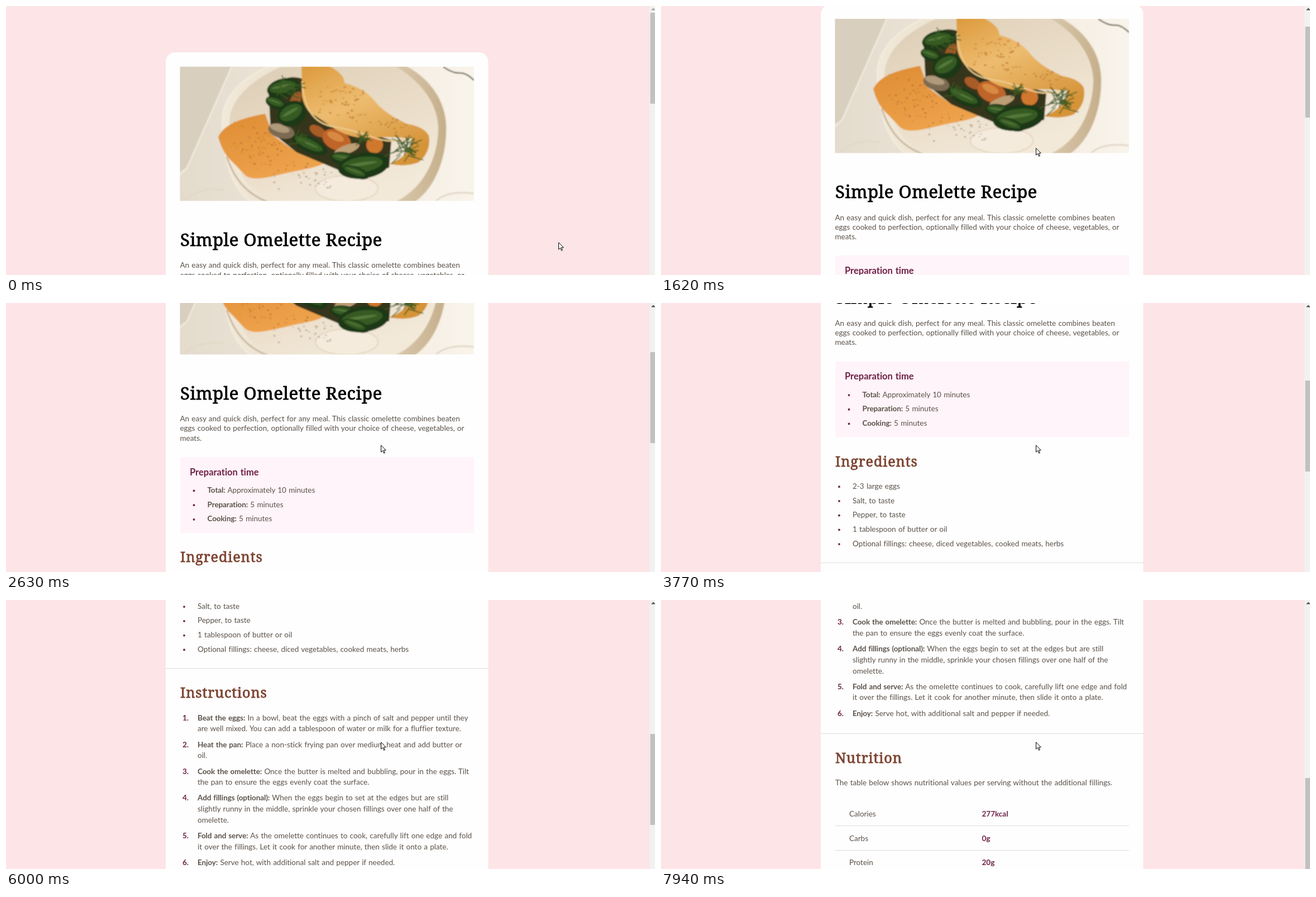
These frames come from a looping animation (1162x482 px, 8 s). An HTML page:

```html
<!DOCTYPE html>
<html lang="en">
<head>
<meta charset="utf-8">
<title>Simple Omelette Recipe</title>
<style>
  html, body { margin: 0; width: 100%; height: 100%; overflow: hidden; background: #fce4e7; }
  svg { display: block; }
  text { font: 13.5px Lato, sans-serif; letter-spacing: -.01px; word-spacing: .8px; fill: #5b5249; }
  .bold { font-weight: 700; letter-spacing: -.1px; }
  .rose { font-weight: 700; fill: #6e2347; }
  .label { font-size: 16.5px; }
  .title, .section { font-family: "Noto Serif", serif; word-spacing: 0; stroke-width: .8px; }
  .title { font-size: 31.2px; letter-spacing: .5px; fill: #000; stroke: #000; }
  .section { font-size: 25.2px; letter-spacing: .9px; fill: #7d4431; stroke: #7d4431; }
  .crisp { shape-rendering: crispEdges; }
</style>
</head>
<body>
<svg width="1162" height="482" viewBox="0 0 1162 482">
  <defs>
    <clipPath id="frame"><rect x="311.5" y="108.8" width="526.5" height="240.5"/></clipPath>
    <filter id="soft" x="0" y="0" width="1" height="1"><feGaussianBlur stdDeviation=".9"/></filter>
    <linearGradient id="marble">
      <stop offset="0" stop-color="#e3dbcc"/><stop offset=".5" stop-color="#eee7da"/><stop offset="1" stop-color="#faf5ec"/>
    </linearGradient>
    <linearGradient id="rim">
      <stop offset="0" stop-color="#f1e8d9"/><stop offset=".6" stop-color="#e8dbc6"/><stop offset="1" stop-color="#c5ae8a"/>
    </linearGradient>
    <linearGradient id="dish" x2=".6" y2="1">
      <stop offset="0" stop-color="#dccdb4"/><stop offset=".55" stop-color="#e9dcc7"/><stop offset="1" stop-color="#f3e9d9"/>
    </linearGradient>
    <linearGradient id="crepe" x2=".6" y2="1">
      <stop offset="0" stop-color="#dc9a3c"/><stop offset=".45" stop-color="#edbc70"/><stop offset="1" stop-color="#d69439"/>
    </linearGradient>
    <linearGradient id="hummus" x2=".5" y2="1">
      <stop offset="0" stop-color="#de8c33"/><stop offset="1" stop-color="#eea34c"/>
    </linearGradient>
  </defs>
  <g id="page">
    <rect x="286" y="83" width="577.5" height="1700" rx="17" fill="#fefefe"/>
    <g clip-path="url(#frame)"><g filter="url(#soft)">
      <rect x="300" y="98" width="550" height="262" fill="url(#marble)"/>
      <path d="M300 98H409L324 290L300 302Z" fill="#d8cfbe"/>
      <path d="M404 109L324 290L311 302" fill="none" stroke="#f2ecdf" stroke-width="2.5"/>
      <path d="M783 109Q800 121 812 120T838 133" fill="none" stroke="#77705a" stroke-width="2.5"/>
      <path d="M770 349Q792 330 838 336M318 349Q350 322 392 330" fill="none" stroke="#e2d8c7" stroke-width="3"/>
      <path d="M468 109C416 134 385 168 387 212C390 280 404 326 440 352H732C772 324 790 268 789 215C787 168 760 130 716 106Z" fill="url(#rim)" stroke="#f5eddf" stroke-width="2"/>
      <path d="M492 109C432 136 399 172 400 212C402 274 425 328 474 352H694C750 328 774 268 774 218C772 172 742 134 694 106Z" fill="url(#dish)"/>
      <path d="M395 270C412 318 436 338 468 351" fill="none" stroke="#c9b89c" stroke-width="3"/>
      <ellipse cx="610" cy="327" rx="56" ry="23" fill="#f4ebdd" stroke="#decfb8" stroke-width="1.5"/>
      <path d="M380 235C390 212 420 201 464 193L478 232L520 262L582 276Q560 288 538 292T478 305T428 303Q412 286 400 274T380 235Z" fill="url(#hummus)"/>
      <g id="food"></g>
      <path d="M529 107H577Q606 121 606 138Q642 147 660 170T718 211Q748 216 757 232Q762 261 739 280Q717 289 686 283Q724 269 727 238Q692 233 654 236T584 217T544 191Q526 170 530 142Z" fill="url(#crepe)"/>
      <path d="M530 135Q532 168 545 190T590 217T656 235T726 236" fill="none" stroke="#eecb8d" stroke-width="2.5"/>
      <g id="garnish"></g>
    </g></g>
    <g id="copy"></g>
  </g>
  <rect x="1152" width="10" height="482" fill="#f1f1f1"/>
  <rect id="thumb" x="1153.5" y="12" width="8.5" height="163" fill="#c1c1c1"/>
  <path id="arrow" d="M1155 7.5L1159 3.5L1163 7.5Z"/>
  <path id="cursor" d="M.5 .8V13.2L3.5 10.4L5.6 15.3L7.4 14.5L5.4 9.8H9.3Z" fill="#fff" stroke="#000"/>
</svg>
<script>
const $ = id => document.getElementById(id);

// Photo details
let seed = 7;
const random = () => (seed = seed * 16807 % 2147483647) / 2147483647;
const spread = (centre, size) => centre + (random() + random() - 1) * size;
const blob = (x, y, rx, ry, turn, fill) =>
  `<ellipse cx="${x}" cy="${y}" rx="${rx}" ry="${ry}" fill="${fill}" transform="rotate(${turn} ${x} ${y})"/>`;
const leaf = (x, y, rx, ry, turn) =>
  blob(x, y, rx, ry, turn, '#1f3716') + blob(x - 2, y - 2, rx * .8, ry * .6, turn, '#345a23') +
  blob(x - 3, y - 3, rx * .6, ry * .13, turn, '#55783a');
const specks = (count, x, y, w, h, size, fill) => Array.from({length: count}, () =>
  blob(spread(x, w), spread(y, h), size * (.5 + random()), size * (.4 + random() * .5), 0, fill)).join('');
function dill(x, y, size, count) {
  let d = '';
  for (let i = 0; i < count; i++) {
    const angle = random() * 6.28, length = size * (.5 + random() * .5);
    d += `M${spread(x, size / 2)} ${spread(y, size / 2)}l${Math.cos(angle) * length} ${Math.sin(angle) * length * .7}`;
  }
  return `<path d="${d}" fill="none" stroke="#3a5a22" stroke-width="1.6"/>`;
}

$('food').innerHTML =
  specks(60, 455, 250, 62, 45, 1.3, '#a9642a') + specks(35, 535, 305, 70, 28, 1.3, '#7d5d3c') +
  '<path d="M470 150Q500 120 530 130L600 215L690 240L686 290L610 300L520 262L474 225Z" fill="#36341d"/>' +
  leaf(497, 147, 30, 17, -12) + leaf(484, 174, 20, 11, 20) +
  blob(493, 224, 24, 13, 15, '#7d6a52') + blob(490, 219, 18, 7, 15, '#b09a7c') +
  blob(518, 170, 9, 18, 25, '#9c5a28') + leaf(512, 193, 27, 22, -30) +
  leaf(544, 249, 34, 14, 25) + blob(558, 224, 16, 9, 30, '#a85b26') +
  blob(592, 240, 27, 18, 25, '#bf6529') + blob(590, 234, 16, 7, 25, '#d98a42') +
  blob(610, 257, 24, 8, -20, '#bd9f76') + blob(660, 249, 15, 15, 30, '#cf782f') +
  leaf(607, 274, 27, 12, 10) + leaf(640, 286, 46, 23, -8) + leaf(626, 298, 25, 10, 20);
$('garnish').innerHTML =
  specks(45, 605, 175, 55, 38, 2, '#c98632') + specks(20, 685, 215, 40, 17, 1.8, '#bd7a2d') +
  dill(714, 254, 31, 38) + dill(638, 239, 18, 20) + dill(503, 147, 26, 22) + dill(528, 238, 18, 16);

// Page copy
const text = (x, y, content, style = '') => `<text x="${x}" y="${y}" class="${style}">${content}</text>`;
const bold = content => `<tspan class="bold">${content}</tspan>`;
const box = (x, y, width, height, fill) =>
  `<rect class="crisp" x="${x}" y="${y}" width="${width}" height="${height}" fill="${fill}"/>`;
const rule = (y, x = 286, width = 577.5) => box(x, y, width, 1, '#dedcda');
const bullets = (x, y, items) => items.map((item, i) => {
  const base = y + i * 25.72;
  return blob(x - 24, base - 3.6, 1.9, 1.9, 0, '#6e2347') + text(x, base, item);
}).join('');

const steps = [
  [`${bold('Beat the eggs:')} In a bowl, beat the eggs with a pinch of salt and pepper until they`,
    'are well mixed. You can add a tablespoon of water or milk for a fluffier texture.'],
  [`${bold('Heat the pan:')} Place a non-stick frying pan over medium heat and add butter or`, 'oil.'],
  [`${bold('Cook the omelette:')} Once the butter is melted and bubbling, pour in the eggs. Tilt`,
    'the pan to ensure the eggs evenly coat the surface.'],
  [`${bold('Add fillings (optional):')} When the eggs begin to set at the edges but are still`,
    'slightly runny in the middle, sprinkle your chosen fillings over one half of the', 'omelette.'],
  [`${bold('Fold and serve:')} As the omelette continues to cook, carefully lift one edge and fold`,
    'it over the fillings. Let it cook for another minute, then slide it onto a plate.'],
  [`${bold('Enjoy:')} Serve hot, with additional salt and pepper if needed.`]
];
let stepY = 987.2;
const instructions = steps.map((lines, i) => {
  const number = text(316, stepY, `${i + 1}.`, 'rose');
  const body = lines.map((line, j) => text(343, stepY + j * 19.7, line)).join('');
  stepY += lines.length * 19.7 + 8.5;
  return number + body;
}).join('');

const nutrition = [['Calories', '277kcal'], ['Carbs', '0g'], ['Protein', '20g']].map(([name, value], i) => {
  const y = 1426.8 + i * 43.6;
  return text(337, y, name) + text(574.5, y, value, 'rose') + rule(y + 16, 311.5, 526.5);
}).join('');

$('copy').innerHTML =
  text(312, 430, 'Simple Omelette Recipe', 'title') +
  ['An easy and quick dish, perfect for any meal. This classic omelette combines beaten',
    'eggs cooked to perfection, optionally filled with your choice of cheese, vegetables, or',
    'meats.'].map((line, i) => text(311.5, 469.4 + i * 17.2, line)).join('') +
  box(311.5, 533.2, 526.5, 135.5, '#fff4f9') +
  text(329, 566, 'Preparation time', 'rose label') +
  bullets(360.5, 597.2, [`${bold('Total:')} Approximately 10 minutes`,
    `${bold('Preparation:')} 5 minutes`, `${bold('Cooking:')} 5 minutes`]) +
  text(312, 721.3, 'Ingredients', 'section') +
  bullets(343, 761.4, ['2-3 large eggs', 'Salt, to taste', 'Pepper, to taste', '1 tablespoon of butter or oil',
    'Optional fillings: cheese, diced vegetables, cooked meats, herbs']) +
  rule(893.4) + text(312, 946.2, 'Instructions', 'section') + instructions +
  rule(1277.4) + text(312, 1330.6, 'Nutrition', 'section') +
  text(312, 1371.2, 'The table below shows nutritional values per serving without the additional fillings.') +
  nutrition;

// Motion, sampled about every 70 ms
const LOOP = 8000, NOTCH = 600 / 7;
// start, end, easing phase at the first sample
const wheel = [
  [1480, 1620, .42], [2020, 2160, .42], [2420, 2630, .215], [2960, 3100, .42], [3560, 3770, .215],
  [4170, 4380, .215], [4780, 4920, .42], [5250, 5450, .03], [5860, 6000, .42], [6460, 6600, .42],
  [6930, 7140, .215], [7400, 7540, .42], [7940, 8150, .215]
];
// start, end, x, y
const moves = [[70, 250, 655, 244], [450, 590, 665, 243], [740, 880, 671, 254]];

const ease = p => { p = Math.min(1, p); return p * p * (3 - 2 * p); };
function sample(time, start, end, gap) {
  const last = Math.round((end - start) / gap);
  return [Math.floor((time - start) / (end - start) * last + 1e-6), last];
}

function draw(time) {
  let scroll = 0, x = 989, y = 423;
  for (const [start, end, phase] of wheel)
    if (time >= start) scroll += NOTCH * ease(phase + .35 * sample(time, start, end, 70)[0]);
  for (const [start, end, toX, toY] of moves) {
    if (time < start) break;
    const [index, last] = sample(time, start, end, 62);
    const p = ease((index + 1) / (last + 1));
    x += (toX - x) * p;
    y += (toY - y) * p;
  }
  $('page').setAttribute('transform', `translate(0 ${-scroll.toFixed(2)})`);
  $('thumb').setAttribute('y', 12 + Math.round(scroll * .2957));
  $('arrow').setAttribute('fill', scroll ? '#505050' : '#a3a3a3');
  $('cursor').setAttribute('transform', `translate(${Math.round(x)} ${Math.round(y)})`);
}

const begin = performance.now();
function tick() {
  draw((performance.now() - begin) % LOOP);
  requestAnimationFrame(tick);
}
tick();
</script>
</body>
</html>
```
